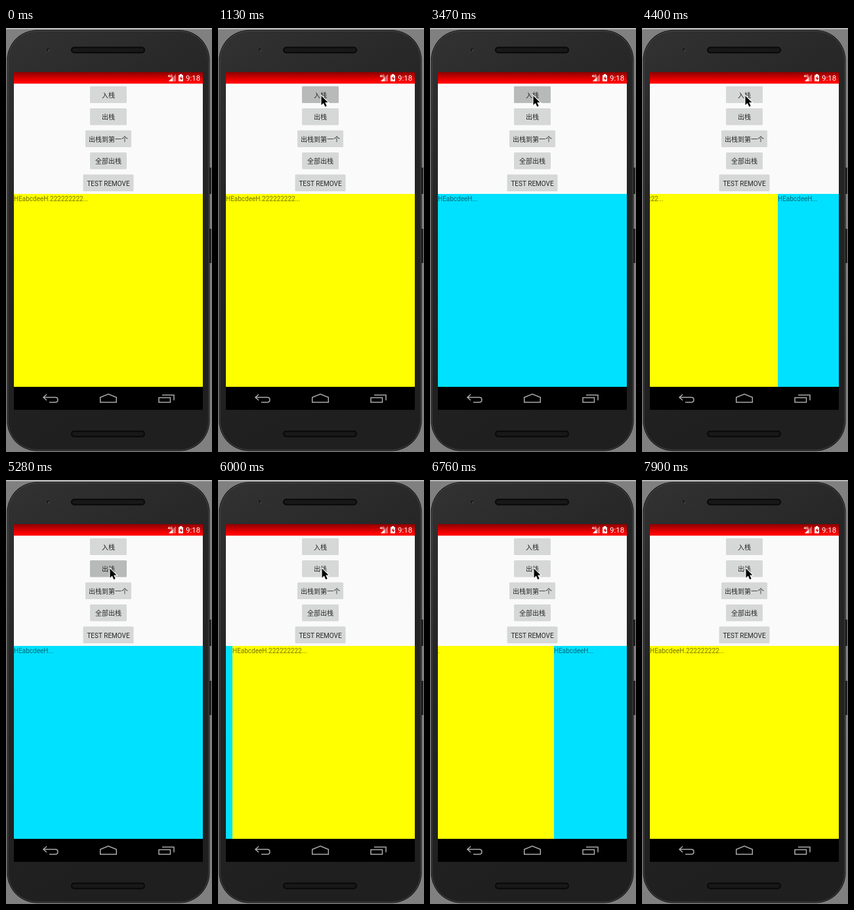
These frames come from a looping animation (314x644 px, 8000 ms). An HTML page:

```html
<!DOCTYPE html>
<html lang="zh">
<meta charset="utf-8">
<title>Fragment stack</title>
<style>
  html, body { margin: 0; width: 100%; height: 100%; overflow: hidden; background: #808080; }
  svg { display: block; }
  text { font: 10px Roboto, "Noto Sans CJK SC", "Noto Sans CJK", sans-serif; }
  #buttons text { fill: #262626; text-anchor: middle; }
  #strip text { fill: #000; fill-opacity: .54; }
</style>
<svg id="stage" width="314" height="644" viewBox="0 0 314 644">
  <defs>
    <linearGradient id="body" x2=".3" y2="1">
      <stop stop-color="#323232"/><stop offset=".4" stop-color="#252525"/><stop offset="1" stop-color="#1f1f1f"/>
    </linearGradient>
    <linearGradient id="bar" x2="0" y2="1">
      <stop stop-color="#8c0000"/><stop offset=".8" stop-color="#f00"/>
    </linearGradient>
  </defs>

  <!-- phone -->
  <rect width="314" height="2" fill="#b8b8b8"/>
  <path d="M309 212h4v40h-4zM309 305h4v52h-4z" fill="#222"/>
  <rect x="1.500" y="3" width="309" height="639.500" rx="46" fill="#141414"/>
  <rect x="3" y="4.500" width="306" height="636.500" rx="44.500" fill="url(#body)" stroke="#5c5c5c" stroke-width=".7"/>
  <circle cx="64" cy="33" r="3" fill="#191919" stroke="#3a3a3a"/>
  <circle cx="65" cy="34" r="1" fill="#555"/>
  <g fill="#181818" stroke="#080808" stroke-width="2">
    <rect x="100" y="29.500" width="111" height="8" rx="4"/>
    <rect x="100" y="612.500" width="111" height="8" rx="4"/>
  </g>

  <!-- screen -->
  <path d="M12 67h288v513H12z"/>
  <path d="M12 84h288v168H12z" fill="#fafafa"/>
  <path d="M12 67h288v17.500H12z" fill="url(#bar)"/>
  <g fill="#fff">
    <text x="246.500" y="75" style="font-size:6px;font-weight:700">4G</text>
    <path d="M259 70v11h-11z" fill-opacity=".4"/>
    <path d="M254 75v6h-6z"/>
    <path d="M265 70h3v1.500h2V81h-7v-9.500h2z"/>
    <path d="M267.500 73l-3 4h2v3l3-4h-2z" fill="#e00000"/>
    <text x="274" y="80" style="font-size:11.500px">9:18</text>
  </g>
  <g id="buttons"></g>
  <svg x="12" y="252" width="288" height="293"><g id="strip"></g></svg>
  <g fill="none" stroke="#aaa" stroke-width="1.500">
    <path d="M62 556.500l-5 4.500 5 4.500M57 561h18q4 0 4 3.700t-4 3.700h-9"/>
    <path d="M143.700 568.500v-7.500l12.300-5 12.300 5v7.500z"/>
    <path d="M233 561.500h17.500v7h-17.500zM238 557.500h18v8"/>
  </g>
  <path id="cursor" d="M0 0v14l3.300-3 2.500 5.500 2.400-1.100-2.500-5.400H10z" stroke="#fff" stroke-width="2" paint-order="stroke"/>
</svg>
<script>
const LOOP = 8000, SLIDE = 380, WIDTH = 288;
const $ = id => document.getElementById(id);
const clamp = v => Math.min(1, Math.max(0, v));
const ease = v => (1 - Math.cos(Math.PI * clamp(v))) / 2;

// label, x, y, width
const buttons = [
  ["入栈", 128, 88.5, 56], ["出栈", 128, 122, 56], ["出栈到第一个", 121, 155.5, 70],
  ["全部出栈", 128, 189, 56], ["TEST REMOVE", 117.5, 222.5, 77]
];
$("buttons").innerHTML = buttons.map(([label, x, y, w]) =>
  `<rect x="${x}" y="${y}" width="${w}" height="25.500" rx="1.500" fill="#d6d7d7"/>
   <text x="156" y="${Math.round(y + 17)}">${label}</text>`).join("");
const faces = $("buttons").querySelectorAll("rect");

// the back stack lies side by side; pushing and popping scroll it
const pages = [["#ff0", "HEabcdeeH.222222222..."], ["#00e1ff", "HEabcdeeH..."]];
$("strip").innerHTML = [0, 1, 2, 3].map(i => {
  const [color, label] = pages[i % 2];
  return `<svg x="${i * WIDTH}" width="${WIDTH}" height="293">
    <rect width="${WIDTH}" height="293" fill="${color}"/><text y="11">${label}</text></svg>`;
}).join("");

const pushes = [2695, 3475, 4254.5], pops = [5395, 5955, 6543];
// [down, up] for the first two buttons
const presses = [
  [[1130, 1250], [2700, 2780], [3470, 3550]],
  [[5280, 5400], [5840, 5960], [6440, 6550], [6960, 7120], [7660, 7860]]
];

function draw(t) {
  const moved = starts => starts.reduce((sum, s) => sum + ease((t - s) / SLIDE), 0);
  const depth = moved(pushes) - moved(pops);
  $("strip").setAttribute("transform", `translate(${-Math.round(depth * WIDTH)})`);

  presses.forEach((times, i) => {
    const down = times.some(([a, b]) => t >= a && t < b);
    faces[i].setAttribute("fill", down ? "#b8baba" : "#d6d7d7");
  });

  const enter = 1 - ease((t - 120) / 760), drop = ease((t - 4640) / 400);
  const x = 157.5 + 160 * enter + drop, y = 103 + 230 * enter + 31.5 * drop;
  $("cursor").setAttribute("transform", `translate(${x} ${y})`);
}

function tick() {
  draw(performance.now() % LOOP);
  requestAnimationFrame(tick);
}
tick();
</script>
</html>
```
